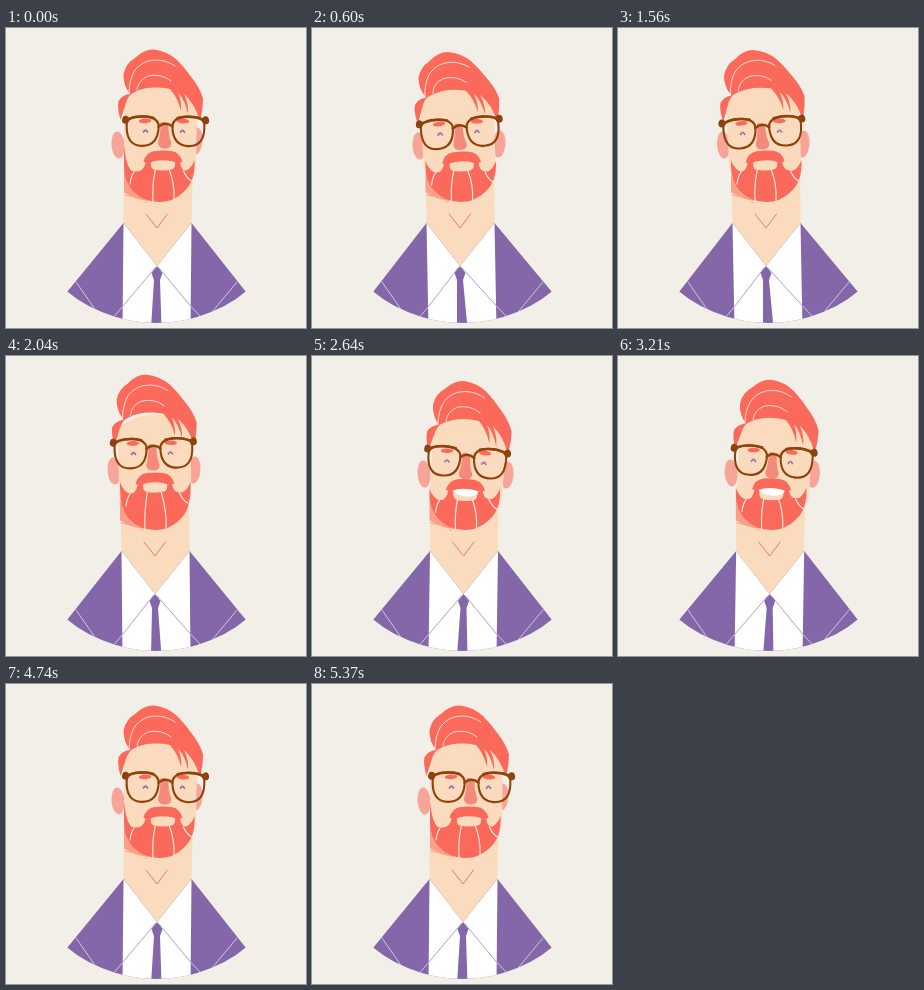
Recreate the animation shown at these times as an HTML page with a canvas. Size 300x300 px, loop 5.4 s.

```html
<!DOCTYPE html>
<html lang="en">
<head>
<meta charset="utf-8">
<title>Bearded man</title>
<style>
html, body { margin: 0; width: 100%; height: 100%; overflow: hidden; background: #f2efe8; }
canvas { display: block; width: 100vw; height: 100vh; }
</style>
</head>
<body>
<canvas id="stage"></canvas>
<script>
const LOOP = 5400;
const C = {
  bg: '#f2efe8', skin: '#fbdbbd', hair: '#fb695b', ear: '#f8a599', stubble: '#fa9f89',
  nose: '#f48a7a', suit: '#8467a8', frame: '#8f430c', white: '#ffffff'
};
const canvas = document.getElementById('stage');
const ctx = canvas.getContext('2d');

// x: head shift, tilt: head angle, hair: hair lift, g*: glasses, m*: mouth, neck: collar shift
const pose = (x, tilt, hair, gx, gy, ga, mx, my, neck, smile, lx, ly, rx, ry) =>
  ({ x, tilt, hair, gx, gy, ga, mx, my, neck, smile, lx, ly, rx, ry });
const right = pose(0, 0, 0, 159.5, 102.5, 0.4, 157, 130, 0, 0, 112, 117, 190, 113);
const left = pose(-4.5, -3, 2, 148, 104, -4, 149.5, 131, -3, 0, 107, 118, 187, 116);
const lean = pose(-5, -3, 0, 144.5, 103.5, -3.6, 147, 130, -3, 0, 105.5, 117, 185, 116);
const up = pose(-4, -1.3, -3, 147.5, 96.5, -1, 149, 124, -2, 0.1, 108, 115, 188, 114);
const grin = pose(-0.5, 1.8, 3.5, 155, 105.5, 3.6, 153.5, 130.5, 0.5, 1, 112, 118, 195, 119);
const glad = pose(0.5, 2.6, 0.5, 156.5, 103.5, 3.2, 154, 128.5, 1, 1, 115, 115, 196, 117);
const keys = [
  [0, right], [100, right], [520, left], [620, left], [1560, lean], [1650, lean],
  [2020, up], [2140, up], [2560, grin], [2650, grin], [3990, glad], [4200, glad],
  [4780, right], [LOOP, right]
];

function poseAt(t) {
  let i = 0;
  while (i < keys.length - 2 && t >= keys[i + 1][0]) i++;
  const [t0, a] = keys[i], [t1, b] = keys[i + 1];
  const u = (t - t0) / (t1 - t0), e = u * u * (3 - 2 * u);
  const p = {};
  for (const k in a) p[k] = a[k] + (b[k] - a[k]) * e;
  return p;
}

function fill(d, color) {
  ctx.fillStyle = color;
  ctx.fill(new Path2D(d));
}
function line(d, color, width) {
  ctx.strokeStyle = color;
  ctx.lineWidth = width;
  ctx.stroke(new Path2D(d));
}
function oval(x, y, rx, ry, color, angle = 0) {
  ctx.fillStyle = color;
  ctx.beginPath();
  ctx.ellipse(x, y, rx, ry, angle, 0, 7);
  ctx.fill();
}
function group(x, y, deg, draw) {
  ctx.save();
  ctx.translate(x, y);
  ctx.rotate(deg * Math.PI / 180);
  draw();
  ctx.restore();
}

function body(n) {
  const l = 117.5 + n, r = 185.5 + n, m = 151 + n;
  ctx.save();
  ctx.beginPath();
  ctx.arc(150.5, 152, 143, 0, 7);
  ctx.clip();
  fill(`M${l} 195L61 264V300H240V264L${r} 195Z`, C.suit);
  fill(`M${l} 195L${m} 238L${r} 195L184.5 300H116.5Z`, C.white);
  line('M117 278L106 291M184.5 278L197 291M70 254L93 287M231 254L201 290', '#d9cfe2', 0.9);
  line(`M${m - 2} 240L117 278M${m + 2} 240L184.5 278`, '#9c87ba', 0.8);
  fill(`M${m} 238L${m + 5.5} 245L${m + 3} 252L155.5 300H145L${m - 3} 252L${m - 5.5} 245Z`, C.suit);
  ctx.restore();
}

function neck(p) {
  const l = 117.5 + p.neck, r = 185.5 + p.neck, m = 151 + p.neck;
  fill(`M${118 + p.x} 130H${187 + p.x}L${r} 195L${m} 238L${l} 195Z`, C.skin);
  line(`M${m - 11} 186L${m} 200L${m + 10.5} 186`, '#ee6c5c', 0.9);
  ctx.save();
  ctx.translate(p.x, 0);
  fill('M118 138V164Q128 171 142 173L158 160Z', C.stubble);
  for (let i = 0; i < 40; i++) {
    const u = (i * 0.618) % 1, v = (i * 0.377) % 1;
    oval(118.8 + u * 22, 164 + u * 8 + v * 3, 0.5, 0.5, C.stubble);
  }
  ctx.restore();
}

function face() {
  fill('M118 72Q150 46 191 70L190 140Q184 166 153 170Q122 164 118 138Z', C.skin);
}

// The beard follows the jaw at its rim and the mouth at its cheek lobes.
function beard(p) {
  const l = 118 + p.x, r = 188.5 + p.x, m = p.mx, y = p.my;
  const turn = Math.max(0, m - 153 - p.x - 1);
  fill(`M${l} ${y + 2 - turn * 5}Q${l + 2} ${y + 9} ${l + 8} ${y + 13}` +
    `Q${m - 19} ${y + 16} ${m - 17} ${y + 3}H${m + 17}` +
    `Q${m + 18} ${y + 15} ${r - 7} ${y + 12}Q${r - 2} ${y + 8} ${r} ${y + 2}` +
    `Q${r + 1} 154 ${r - 11} 164Q${r - 21} 174 ${l + 35} 174` +
    `Q${l + 20} 174 ${l + 9} 163Q${l} 153 ${l} ${y + 8}Z`, C.hair);
  line(`M${l + 10} ${y + 14}Q${l + 7} ${y + 18} ${l + 6} ${y + 26}` +
    `M${m - 7.5} ${y + 11}Q${m - 11} 156 ${m - 10} 173` +
    `M${m + 6} ${y + 11}Q${m + 12} 156 ${m + 11} 172` +
    `M${r - 11} ${y + 13}Q${r - 8} ${y + 20} ${r - 3} ${y + 23}`, '#fff1e9', 1.1);
}

function mouth(smile) {
  const low = 12.5 + smile * 2;
  fill(`M-12 2H12Q13 ${low - 2} 9 ${low - 1}Q0 ${low + 1} -9 ${low - 1}Q-13 ${low - 2} -12 2Z`, C.skin);
  if (smile > 0.02) {
    ctx.globalAlpha = smile;
    fill('M-15 1Q0 3 14 1Q14 9.5 2 10Q-12 9.5 -15 1Z', C.white);
    ctx.globalAlpha = 1;
  }
  fill('M-19.5 4Q-17 -6 -8 -7Q0 -8 8 -7Q17 -6 19.5 4Q13 5.5 10 3.5Q0 1 -10 3.5Q-13 5.5 -19.5 4Z', C.hair);
}

function hair() {
  fill('M114.5 92Q111 80 112.5 73Q116 67 124 66Q117 57 117.5 46Q120 35 129 30Q138 21 148 21.5' +
       'Q161 23 171 32Q179 40 186 50Q194 60 197 70.5Q197 81 194.5 91L193 91' +
       'Q189 76 178 66Q183 76 182 86Q179 72 172 64.5Q176 74 175 83Q172 70 164 61' +
       'Q143 57 129 64Q122 66 119 78Z', C.hair);
  line('M123 65Q123 52 129 42Q137 32 150 32Q160 32 169 38M131 62Q132 52 142 48Q155 45 165 53',
       '#ffe7dc', 0.9);
}

function nose() {
  fill('M-5 -8Q0 -10 3 -5Q3 6 6 12Q6 18 0 18Q-7.5 18 -7.5 12Q-5 5 -5 -8Z', C.nose);
}

function eyes() {
  for (const s of [-1, 1]) {
    oval(s * 19 - 1.5, -9.5, 6.2, 2.3, C.hair, s * 0.06);
    const x = s * 18.5 - 1.5;
    line(`M${x - 3.5} 1Q${x} -4.5 ${x + 3.5} 1`, '#efb3a5', 0.7);
    line(`M${x - 2} 1.8Q${x} -2 ${x + 2} 1.8`, C.suit, 1.4);
  }
  oval(22, 17, 0.6, 0.6, C.nose);
  oval(25, 20, 0.5, 0.5, C.nose);
}

function glasses() {
  for (const s of [-1, 1]) {
    ctx.save();
    ctx.scale(s, 1);
    line('M6.8 -5Q8 -13.5 22 -14Q37 -14.5 38.8 -7Q40 15.5 23.5 15.5Q7 15.5 6.8 -5Z', C.frame, 2.1);
    line('M12 -12.5Q24 -15.5 37 -11.5', C.frame, 2.5);
    oval(40.2, -10.5, 3.3, 4, C.frame, -0.2);
    ctx.restore();
  }
  line('M-7 -4Q0 -9.5 7 -4', C.frame, 2.6);
}

function draw(t) {
  const p = poseAt(t);
  const w = innerWidth, h = innerHeight, dpr = devicePixelRatio || 1;
  const pw = Math.round(w * dpr), ph = Math.round(h * dpr);
  if (canvas.width !== pw || canvas.height !== ph) {
    canvas.width = pw;
    canvas.height = ph;
  }
  ctx.setTransform(pw / 300, 0, 0, ph / 300, 0, 0);
  ctx.lineCap = ctx.lineJoin = 'round';
  ctx.fillStyle = C.bg;
  ctx.fillRect(0, 0, 300, 300);

  body(p.neck);
  oval(p.lx, p.ly, 6.5, 13.5, C.ear, -0.08);
  oval(p.rx, p.ry, 6.5, 13.5, C.ear, 0.08);
  neck(p);
  const head = (dy, paint) => group(152 + p.x, 172 + dy, p.tilt, () => {
    ctx.translate(-152, -172);
    paint();
  });
  head(0, face);
  beard(p);
  group(p.gx, p.gy, p.ga, nose);
  group(p.mx, p.my, p.ga * 0.5, () => mouth(p.smile));
  head(p.hair, hair);
  group(p.gx, p.gy, p.ga, () => {
    eyes();
    glasses();
  });
}

let start;
function tick(now) {
  if (start === undefined) start = now;
  draw((now - start) % LOOP);
  requestAnimationFrame(tick);
}
draw(0);
requestAnimationFrame(tick);
</script>
</body>
</html>
```
